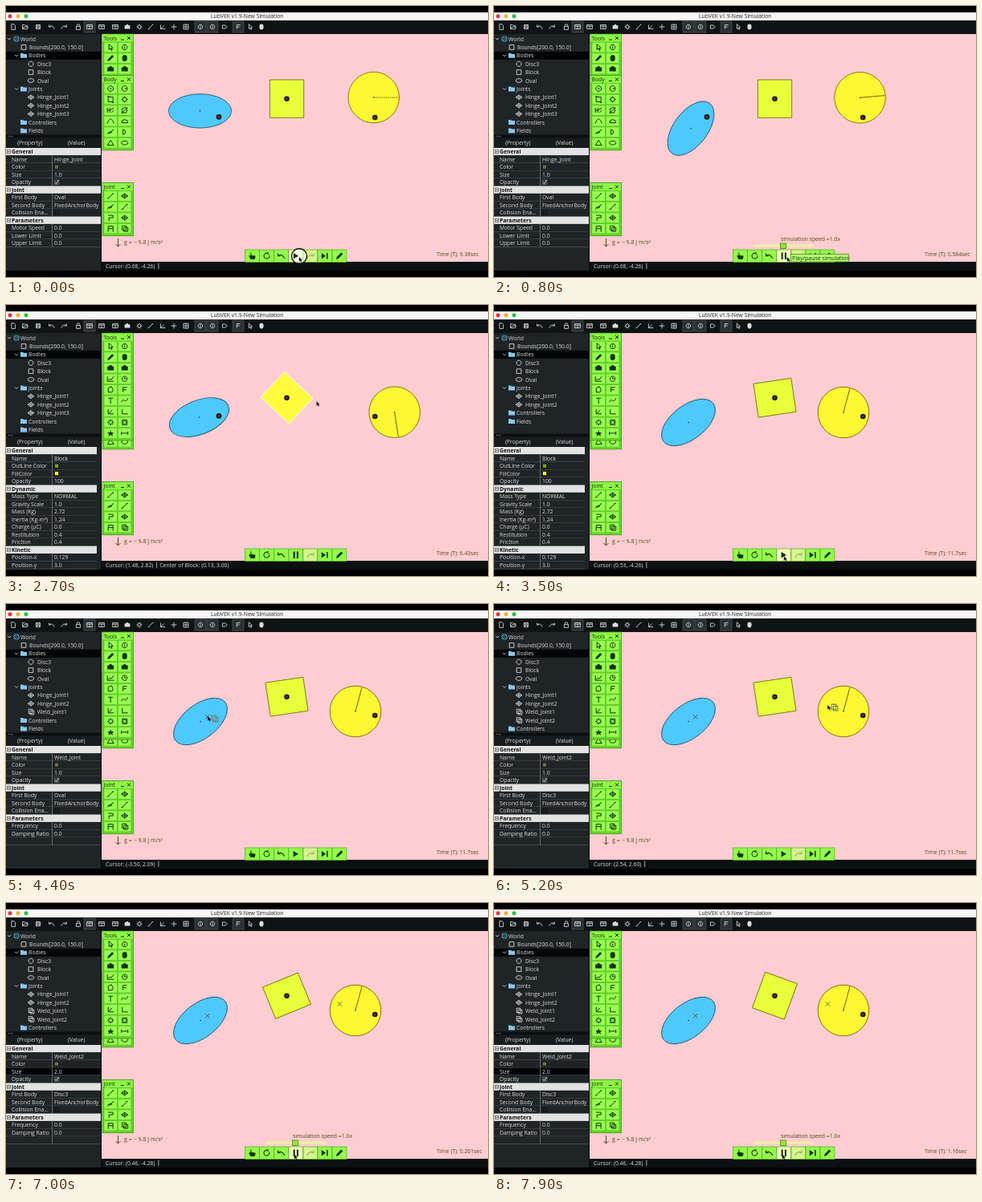
Recreate the animation shown at these times as an HTML page with a canvas. Size 600 by 338 pixels, loop 8 s.

```html
<!DOCTYPE html>
<html lang="en">
<head>
<meta charset="utf-8">
<title>Hinge and weld joints</title>
<style>
html, body { margin: 0; width: 100%; height: 100%; overflow: hidden; background: #000; }
canvas { display: block; width: 600px; height: 338px; }
</style>
</head>
<body>
<canvas id="stage" width="600" height="338"></canvas>
<script>
const g = document.getElementById('stage').getContext('2d');
const LOOP = 8000, START = 188, CUT = 2000, SELECT = 2400, PAUSE = 3500;
const WELD1 = 4200, WELD2 = 5200, EDIT = 5700, APPLY = 6300, REPLAY = 6740;
const RAD = Math.PI / 180, INK = '#0d3306', LIGHT = '#dedede', NOTE = '#4c4a10';

// Drawing helpers
function rect(x, y, w, h, fill, line) {
  if (fill) { g.fillStyle = fill; g.fillRect(x, y, w, h); }
  if (line) { g.strokeStyle = line; g.lineWidth = 0.8; g.strokeRect(x, y, w, h); }
}
function text(s, x, y, color = LIGHT, size = 6.8, bold = '') {
  g.font = `${bold} ${size}px "Open Sans", "Noto Sans", sans-serif`;
  g.fillStyle = color;
  g.textBaseline = 'alphabetic';
  g.fillText(s, x, y + 2.5);
}
function dot(x, y, r, fill, line, width = 1) {
  g.beginPath();
  g.arc(x, y, r, 0, 7);
  if (fill) { g.fillStyle = fill; g.fill(); }
  if (line) { g.strokeStyle = line; g.lineWidth = width; g.stroke(); }
}
// A leading "!" marks a filled icon.
function icon(d, x, y, color = INK, scale = 1) {
  const solid = d[0] === '!', path = new Path2D(solid ? d.slice(1) : d);
  g.save();
  g.translate(x, y);
  g.scale(scale, scale);
  g.strokeStyle = g.fillStyle = color;
  g.lineWidth = 1;
  solid ? g.fill(path) : g.stroke(path);
  g.restore();
}

// Icon shapes around (0, 0)
const ring = r => `M${r} 0A${r} ${r} 0 1 1 ${r}-.01`;
const oval = 'M4 0A4 2.5 0 1 1 4-.01', box = 'M-3-3H3V3H-3Z', pin = ring(3.2) + 'M0-1V2M0-2.2V-1.6';
const pointer = '!M-2-4V3L-.3 1.4 1 4 2 3.5.8 1H3Z', outline = pointer.slice(1), pencil = '!M-4 4L-3 1 2-4 4-2-1 3Z';
const diamond = 'M-4 0L0-3 4 0 0 3ZM-4 0H4M0-3V3', weld = 'M-3-3.5H2V2H-3ZM-1-1.5H4V3.5H-1Z';
const link = 'M-3 3L3-3M-4 3H-2M2-3H4', spring = 'M-4 3L-2 0 -1 2 0-1 1 1 2-2 4-3';
const curve = 'M-4 3C-2-5 2-4 4 3', wave = 'M-4 2C-2-6 1 6 4-3', axes = 'M-3-3V3H4M-3 3L2-2';
const gear = ring(2.4) + 'M0-4V-2.4M0 2.4V4M-4 0H-2.4M2.4 0H4M-2.8-2.8L-1.7-1.7M1.7 1.7L2.8 2.8M2.8-2.8L1.7-1.7M-1.7 1.7L-2.8 2.8';
const camera = '!M-4-2H-2L-1-3.5H1L2-2H4V3H-4Z', lock = 'M-3-.5H3V4H-3ZM-2-.5V-2A2 2 0 0 1 2-2V-.5';
const page = 'M-2.5-4H1L3-2V4H-2.5Z', folder = '!M-4-3H-1L0-2H4V3H-4Z', disk = box + 'M-1.5-3V-1H1.5V-3M-2 3V.5H2V3';
const open = 'M-4 3V-3H-1L0-2H3V0M-4 3L-2 0H4L3 3Z', panel = 'M-4-3H4V3H-4ZM-4-1H4M0-1V3';
const grid = 'M-3.5-3.5H3.5V3.5H-3.5ZM0-3.5V3.5M-3.5 0H3.5', cross = 'M-4 0H4M0-4V4';
const chart = 'M-4-3V3H4M-3 2L-1 0 1 1 4-3', star = '!M0-4L1-1H4L2 1 3 4 0 2-3 4-2 1-4-1H-1Z';
const tri = 'M0-3.5L4 3H-4Z', half = 'M-2-3A3 3 0 0 1-2 3Z', tag = 'M-3-2.5H1L4 0 1 2.5H-3Z';
const undo = 'M-4 0Q0-4 4 3M-4 0V-3M-4 0H-1', redo = 'M4 0Q0-4-4 3M4 0V-3M4 0H1';
const mouse = '!M-3-1A3 3 0 0 1 3-1V1A3 3 0 0 1-3 1Z', poly = 'M-3-2L1-4 3 0 2 3-3 3Z', el = 'M-2 3V-3H3M-2 0H2';
const reload = 'M3-1A3.3 3.3 0 1 1 0-3.3L2-4M0-3.3L2-1.8', hand = '!M-2 4L-4 0-3-1-2 0V-4H-1V-1L4 0 3 4Z';

function shell() {
  rect(0, 0, 600, 338, '#000');
  rect(0, 8, 600, 10, '#f7f7f7');
  ['#e0383f', '#f0b429', '#30bd40'].forEach((c, i) => dot(5 + i * 10, 12.7, 2.5, c));
  text('LubVEK v1.9-New Simulation', 255, 12.7, '#222');
  rect(0, 18, 600, 17, '#0e1314');
  for (const x of [104, 242, 257, 289]) rect(x - 7, 19, 14, 14, '#2b3032', '#4a4f51');
  const bar = [[9, page], [24, open], [40, disk], [57, undo], [72, redo], [90, lock], [104, panel], [119, panel], [136, panel],
    [151, camera], [166, gear], [180, link], [195, axes], [209, cross], [224, grid], [242, pin], [257, pin],
    [272, tag], [289, el], [304, outline], [318, mouse]];
  for (const [x, d] of bar) icon(d, x, 26, '#dcdcdc', 0.85);
  rect(0, 35, 119, 295, '#1f2427');
  rect(119, 35, 481, 284, '#fecdd1');
  rect(119, 319, 481, 11, '#0c1011');
}

function tree(t) {
  const joints = ['Hinge_Joint1', 'Hinge_Joint2'];
  if (t < PAUSE) joints.push('Hinge_Joint3');
  if (t >= WELD1) joints.push('Weld_Joint1');
  if (t >= WELD2) joints.push('Weld_Joint2');
  const rows = [['World', 0], ['Bounds[200.0, 150.0]', 1, box], ['Bodies', 1], ['Disc3', 2, ring(3.2)], ['Block', 2, box],
    ['Oval', 2, oval], ['Joints', 1], ...joints.map(j => [j, 2, j[0] === 'H' ? diamond : weld]), ['Controllers', 1], ['Fields', 1]];
  g.save();
  g.beginPath();
  g.rect(0, 35, 119, 125.5);
  g.clip();
  rows.forEach(([name, level, shape], i) => {
    const y = 41 + i * 10.4, x = 13 + level * 9;
    if (name === 'Bodies') rect(0, y - 5, 119, 10, '#030606');
    if (!level) {
      dot(x, y, 3.8, '#4a7f9c');
      icon(ring(2) + cross, x, y, '#23404f', 0.9);
    } else if (shape) icon(shape, x, y, '#cfcfcf', 0.95);
    else icon(folder, x, y, '#8cc6ec');
    if (level < 2 && !shape && i < rows.length - 2) icon('M-2-1L0 1 2-1', x - 9, y, '#bbb');
    text(name, [18, 29, 39][level] - (level === 1 && !shape ? 1 : 0), y);
  });
  g.restore();
  rect(0, 160.5, 119, 4, '#0b0e0f');
  icon('M-2 1L0-1 2 1M3-1L5 1 7-1', 4, 162.5, '#999', 0.7);
}

const jointRows = (name, size, body, extra) => ['General', ['Name', name], ['Color', '#6f6e4c'], ['Size', size], ['Opacity', true],
  'Joint', ['First Body', body], ['Second Body', 'FixedAnchorBody'], ['Collision Ena...', false], 'Parameters', ...extra];
const weldExtra = [['Frequency', '0.0'], ['Damping Ratio', '0.0'], ['', '']];

function propRows(t) {
  if (t < SELECT)
    return jointRows('Hinge_Joint', '1.0', 'Oval', [['Motor Speed', '0.0'], ['Lower Limit', '0.0'], ['Upper Limit', '0.0']]);
  if (t < WELD1) return ['General', ['Name', 'Block'], ['OutLine Color', '#7fa51c'], ['FillColor', '#fbf72a'], ['Opacity', '100'],
    'Dynamic', ['Mass Type', 'NORMAL'], ['Gravity Scale', '1.0'], ['Mass (Kg)', '2.72'], ['Inertia (Kg-m²)', '1.24'],
    ['Charge (µC)', '0.0'], ['Restitution', '0.4'], ['Friction', '0.4'], 'Kinetic', ['Position-x', '0.129'], ['Position-y', '3.0']];
  if (t < WELD2) return jointRows('Weld_Joint', '1.0', 'Oval', weldExtra);
  return jointRows('Weld_Joint2', t < APPLY ? '1.0' : '2.0', 'Disc3', weldExtra);
}

function properties(t) {
  const editing = t >= EDIT && t < APPLY, rows = propRows(t);
  const width = rows.length > 15 ? 113 : 118; // a long list leaves room for its scroll bar
  rect(0, 165, 119, 12, '#171c1e');
  text('(Property)', 14, 170.5);
  text('(Value)', 77, 170.5);
  rows.forEach((row, i) => {
    const y = 181.7 + i * 9.52, top = y - 4.7;
    if (typeof row === 'string') {
      rect(0, top, width, 9.2, '#e2e2e2');
      rect(1.5, y - 2, 4, 4, '#fff', '#555');
      icon('M-1.2 0H1.2', 3.5, y, '#222');
      return text(row, 7, y, '#111', 6.8, 'bold');
    }
    const [name, value] = row;
    rect(0, top, width, 9, name === 'Size' && t >= EDIT ? '#030606' : '#1f2426');
    rect(0, top + 9, width, 0.6, '#5a5f61');
    rect(57, top, 0.7, 9.4, '#85898b');
    text(name, 7, y);
    if (typeof value === 'boolean') {
      rect(60.5, y - 2.7, 5.4, 5.4, value ? '#363b3d' : '#1a1e20', value ? '#666' : '#0e1112');
      if (value) icon('M-2 0L-.5 2 3-3', 63, y, '#ddd', 0.9);
    } else if (value[0] === '#') rect(60.5, y - 2.6, 5, 5, value, '#181a12');
    else {
      if (name === 'Size' && editing) {
        rect(60, y - 4, 12, 8, '#356ba8');
        icon('M-2-1L0-3 2-1M-2 1L0 3 2 1', 114, y, '#888', 0.8);
      }
      text(value, 60, y);
    }
  });
  rect(118, 35, 1, 295, '#080a0b');
}

function palette(name, y, icons) {
  const rows = icons.length / 2;
  rect(120, y, 38.5, 12 + rows * 13.55, '#66d626', '#3f9a14');
  rect(120.5, y + 0.5, 37.5, 9, '#8df544');
  text(name, 121.5, y + 5, INK);
  icon('M-2 2H2', 145, y + 5);
  icon('M-2-2L2 2M2-2L-2 2', 153, y + 5);
  icons.forEach((d, i) => {
    const x = 122 + i % 2 * 17.5, top = y + 10.3 + (i >> 1) * 13.55;
    rect(x, top, 16.3, 12.5, '#98ff50', '#62c62a');
    icon(d, x + 8.2, top + 6.2);
  });
}

const toolIcons = [outline, pin, pencil, mouse, camera, camera, chart, ring(3.2) + 'M0-2V0H2', poly, el, 'M-3-3H3M0-3V4', wave,
  axes, 'M-3-3V3H4', gear, ring(2) + box, star, 'M-4 0H4M-4-2V2M4-2V2'];
const bodyIcons = [ring(3.4) + ring(0.7), ring(3.4) + 'M0 0H3', box + 'M-4-4H-2M2 4H4', gear, 'M-4-3V3M-1-3V3M-4 0H-1L4-3M1 3L4 0',
  poly + link, curve, 'M-4 2A4 4 0 0 1 4 2Z', spring, half, tri, oval];
const jointIcons = [link, diamond, spring, link, 'M-3-3H3V0H-2V4', diamond, 'M-3 4V-3H3V4M-3 0H3', weld];

function palettes(t) {
  const expanded = t >= CUT;
  if (expanded) palette('Body', 86.5, bodyIcons);
  palette('Tools', 35, expanded ? toolIcons : toolIcons.slice(0, 6));
  if (!expanded) palette('Body', 86.5, bodyIcons);
  palette('Joint', 220.5, jointIcons);
}

// Angle of a pendulum released at rest from a, with natural frequency w
function swing(a, w, time) {
  const n = Math.ceil(time / 0.004), h = time / n;
  for (let i = 0, v = 0; i < n; i++) {
    v -= w * w * Math.sin(a) * h;
    a += v * h;
  }
  return a;
}
function clock(t) {
  if (t < START) return 9.38;
  if (t < CUT) return (t - START) * 0.952 / 1000;
  if (t < PAUSE) return 6.43 + (t - 2700) / 1000;
  return t < REPLAY ? 11.7 : (t - REPLAY) / 1000;
}

function pose(t) {
  const T = t < START ? 0 : clock(t);
  if (t >= PAUSE) {
    const spin = t < REPLAY ? 0 : -53 * T;
    return { oval: [242, 146.5, -37.8 * RAD], disc: [435, 134, -75 * RAD], block: (spin - 98.5) * RAD };
  }
  const hang = (px, py, len, start, w, time) => {
    const a = swing(start * RAD, w, time);
    return [px - len * Math.sin(a), py + len * Math.cos(a), a - start * RAD];
  };
  const block = t < SELECT ? 0 : t < 2700 ? -47 * (t - SELECT) / 300 : -47 - 53 * (t - 2700) / 1000;
  return {
    oval: hang(265, 138.3, 24.6, 107.5, 2.36, T),
    // The disc lost time in a turn that is cut out.
    disc: hang(459.3, 139, 25, 176.4, 2.58, t < CUT ? T : T - 1.2),
    block: block * RAD
  };
}

function body(x, y, angle, fill, line, trace) {
  g.save();
  g.translate(x, y);
  g.rotate(angle);
  g.beginPath();
  trace();
  g.fillStyle = fill;
  g.fill();
  g.strokeStyle = line;
  g.lineWidth = 0.9;
  g.stroke();
  g.restore();
  dot(x, y, 0.8, '#333');
}
function hinge(x, y) {
  dot(x, y, 3.3, '#1d1712');
  dot(x, y, 1.3, '#5a4432');
}

function bodies(t) {
  const p = pose(t), picked = t >= SELECT && t < PAUSE;
  const square = () => g.rect(-21.2, -23.7, 42.4, 47.4);
  body(...p.oval, '#4ec9ff', '#245777', () => g.ellipse(0, 0, 39, 21.2, 0, 0, 7));
  if (picked) body(349.5, 115.7, p.block, '#fff', '#fff4e0', () => g.rect(-22, -24.5, 44, 49));
  body(349.5, 115.7, p.block, picked ? '#fffb3c' : '#e8ff3a', picked ? '#fdf9a0' : '#6d7a17', square);
  body(...p.disc, '#fff733', '#7d7216', () => g.arc(0, 0, 31.8, 0, 6.2832));
  const [x, y, a] = p.disc;
  g.strokeStyle = '#5c5414';
  g.lineWidth = 0.9;
  g.setLineDash(t < START ? [1.5, 1] : []);
  g.beginPath();
  g.moveTo(x, y);
  g.lineTo(x + 31 * Math.cos(a), y + 31 * Math.sin(a));
  g.stroke();
  g.setLineDash([]);
  if (t < PAUSE) hinge(265, 138.4);
  hinge(349.5, 115.7);
  hinge(459.3, 139);
  const mark = 'M-2.7-2.7L2.7 2.7M2.7-2.7L-2.7 2.7';
  if (t >= WELD1) icon(mark, 250.7, 140.7, '#555a40');
  if (t >= WELD2) icon(mark, 415.5, 126, t < APPLY ? '#fffbd0' : '#77701c', t < APPLY ? 0.6 : 1);
}

// Pointer stops: time, x, y
const stops = [[0, 365, 313], [1750, 365, 313], [2000, 150, 80], [2400, 372, 112], [2700, 386.7, 120], [3000, 386.7, 120],
  [3300, 361, 313], [3500, 361, 313], [3850, 147, 278], [4200, 251.3, 140], [4450, 251.3, 140], [4750, 147, 278],
  [5150, 415.5, 126], [5350, 415.5, 126], [5700, 92, 211], [6250, 92, 211], [6650, 359, 313.5], [LOOP, 359, 313.5]];
function pointerAt(t) {
  const i = stops.findIndex(s => s[0] > t), [t0, x0, y0] = stops[i - 1], [t1, x1, y1] = stops[i];
  const u = (t - t0) / (t1 - t0), k = u * u * (3 - 2 * u);
  return [x0 + (x1 - x0) * k, y0 + (y1 - y0) * k];
}

function controls(t, hover) {
  const running = t >= START && t < PAUSE || t >= REPLAY;
  const play = running ? '!M-3-4H-1V4H-3ZM1-4H3V4H1Z' : '!M-3-3.5L3 0-3 3.5Z';
  [hand, reload, undo, play, redo, '!M-4-3.5L1 0-4 3.5ZM2-3.5H3.5V3.5H2Z', pencil].forEach((d, i) => {
    const x = 297.5 + i * 18.1, fill = i === 3 && hover ? '#f4ffc0' : i === 4 ? '#d6f58c' : '#94fb4c';
    rect(x, 304, 17.8, 15.5, fill, '#55b426');
    icon(d, x + 9, 311.7, i === 4 ? '#9aad66' : INK, 1.05);
  });
  if (hover && running) {
    text('simulation speed =1.0x', 357, 290.7, NOTE, 6.9);
    rect(323, 297.5, 75, 3, '#f1f0a4');
    rect(356.5, 296, 7, 6.5, '#93e33c', '#55801c');
    if (t > 500 && t < 1800) {
      rect(369.5, 309.5, 72, 9.5, '#b8ff72', '#4d8a24');
      text('Play/pause simulation', 371, 314.2, INK, 7);
    }
  }
}

function overlay(t) {
  const [x, y] = pointerAt(t), hover = y > 302 && x > 351 && x < 370;
  icon('M0-5V5M-3 2L0 5 3 2', 139.5, 295, NOTE);
  text('g = − 9.8 ĵ m/s²', 147, 294.7, NOTE, 7.1);
  controls(t, hover);
  text(`Time (T): ${clock(t).toPrecision(3)}sec`, 536, 309.7, NOTE);

  const worldX = (Math.max(x, 119.7) - 346.5) / 27.2, worldY = (196.9 - (x < 120 ? 205.9 : y)) / 27.26;
  const place = `Cursor: (${worldX.toFixed(2)}, ${worldY.toFixed(2)})`;
  text(place, 124, 324);
  const end = 124 + g.measureText(place).width + 3;
  rect(end + 1, 320.5, 0.8, 7.5, '#ccc');
  if (t >= SELECT && t < PAUSE) text('Center of Block: (0.13, 3.00)', end + 5, 324);

  if (t < START) {
    dot(365, 312, 9.5, 'rgba(255,255,255,.55)', '#111', 1.3);
    icon('!M-3-3.5L3 0-3 3.5Z', 361, 311.7);
  }
  const welding = t > 3850 && t < 4500 || t > 4750 && t < 5350;
  if (welding) icon(weld, x + 8, y + 3, '#6f7f80', 1.1);
  if (t >= EDIT && t < APPLY) icon('M-2-4Q0-4 0-2V2Q0 4-2 4M2-4Q0-4 0-2M0 2Q0 4 2 4', x, y, '#eee');
  else icon(pointer, x + 1.5, y + 3.3, '#111', 0.85);
}

function draw(now) {
  const t = now % LOOP;
  shell();
  tree(t);
  properties(t);
  bodies(t);
  palettes(t);
  overlay(t);
  requestAnimationFrame(draw);
}
requestAnimationFrame(draw);
</script>
</body>
</html>
```
